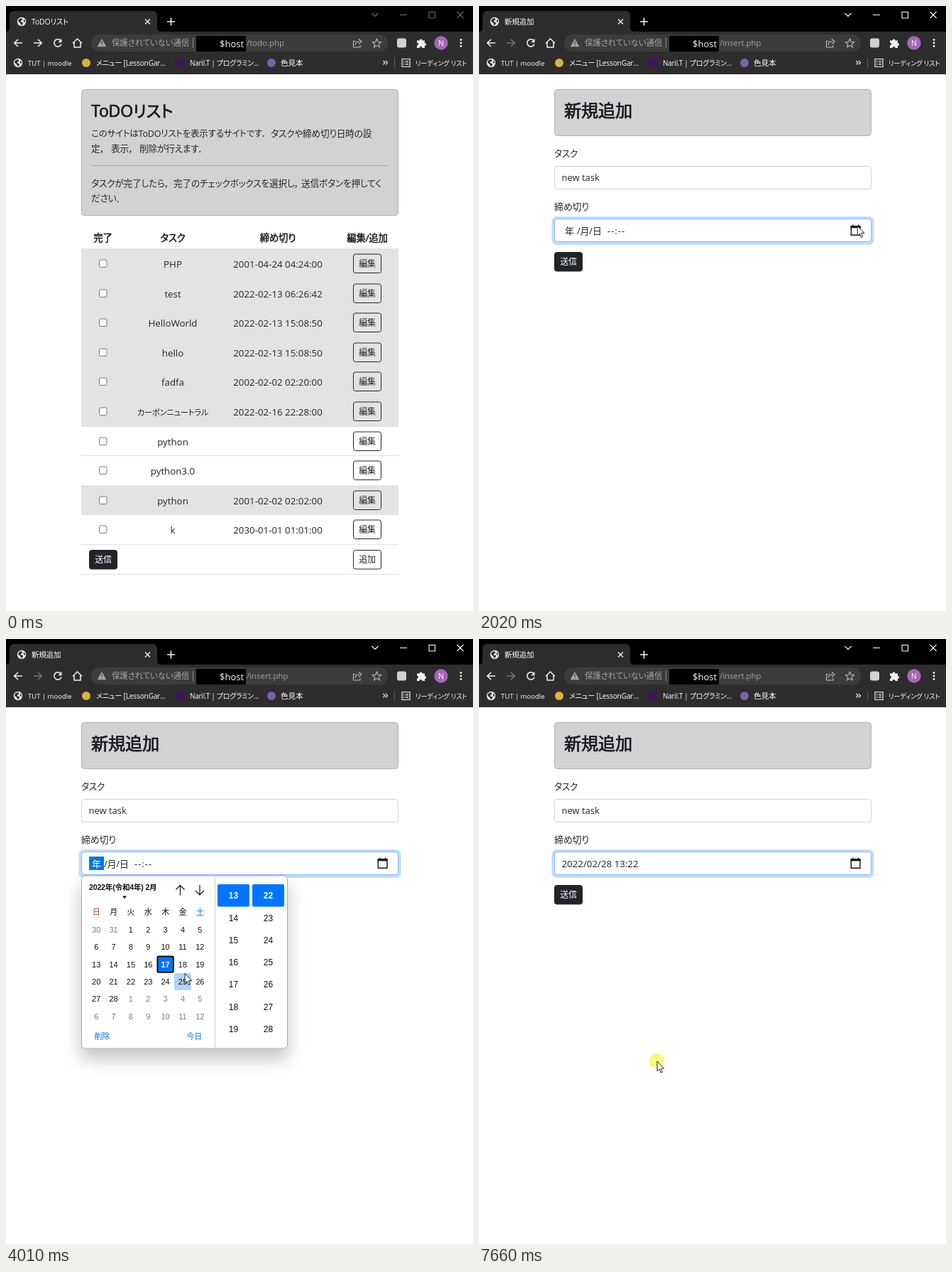
Animation of 658 by 851 pixels, one loop 7.99 s. Source, as an HTML page:

```html
<!DOCTYPE html>
<html lang="ja">
<head>
<meta charset="utf-8">
<title>ToDOリスト</title>
<style>
  html, body { margin: 0; width: 100%; height: 100%; overflow: hidden; background: #fff; }
  svg { display: block; width: 658px; height: 851px; }
  text { font-family: "Open Sans", "Noto Sans CJK JP", "Noto Sans CJK", sans-serif; white-space: pre; }
  .cjk { font-feature-settings: "palt"; letter-spacing: -.2px; }
  .pick { font-family: "Liberation Sans", "Noto Sans CJK JP", "Noto Sans CJK", sans-serif; }
</style>
</head>
<body>
<svg id="stage" viewBox="0 0 658 851" xmlns="http://www.w3.org/2000/svg"></svg>
<script>
const LOOP = 7990;
const INK = '#212529', BLUE = '#0075ff', HOVER = '#b2d3fb';

// Each step holds until the next one; unset fields carry over, `hover` and `click` do not.
const steps = [
  { at: 0, page: 'list' },
  { at: 330, cursor: 'arrow', x: 479, y: 758, hover: 'row' },
  { at: 670, cursor: 'hand', x: 499, y: 776, hover: 'add' },
  { at: 1020, page: 'insert', hover: 'status' },
  { at: 1350, cursor: 'arrow', x: 461.5, y: 609 },
  { at: 1690, x: 357.5, y: 184.5 },
  { at: 2020, x: 533, y: 309, typed: true, focus: true },
  { at: 2350, popup: true },
  { at: 2680, x: 265, y: 349, hover: 'down' },
  { at: 3010, x: 249, y: 404, hover: [5, 0] },
  { at: 3340, x: 172, y: 437, hover: [2, 1] },
  { at: 3680, x: 233.5, y: 480, hover: [4, 3] },
  { at: 4010, x: 251.8, y: 470, hover: [5, 3] },
  { at: 4340, x: 158.5, y: 503.5, hover: [1, 4] },
  { at: 4670, x: 161.5, y: 503.5, hover: [1, 4] },
  { at: 5350, x: 277.5, y: 475.5, picked: true, hover: [5, 3] },
  { at: 5680, x: 368, y: 391, hover: 'minute' },
  { at: 6010, x: 345.5, y: 392 },
  { at: 6340, x: 270, y: 529, hover: [6, 5] },
  { at: 6660, x: 262.5, y: 571 },
  { at: 7000, x: 247, y: 575 },
  { at: 7340, plain: true },
  { at: 7660, x: 250.7, y: 593.5, popup: false, click: true }
];
steps.reduce((prev, step) => Object.assign(step,
  { ...prev, hover: null, click: false, ...step }), {});

const rect = (x, y, w, h, fill, more = '') =>
  `<rect x="${x}" y="${y}" width="${w}" height="${h}" fill="${fill}" ${more}/>`;
const circle = (x, y, r, fill, more = '') =>
  `<circle cx="${x}" cy="${y}" r="${r}" fill="${fill}" ${more}/>`;
const line = (d, color, width = 1, more = '') =>
  `<path d="${d}" fill="none" stroke="${color}" stroke-width="${width}" ${more}/>`;
const shape = (d, fill, more = '') => `<path d="${d}" fill="${fill}" ${more}/>`;
const frame = (x, y, w, h, fill, color, r = 3, width = 1) =>
  rect(x, y, w, h, fill, `rx="${r}" stroke="${color}" stroke-width="${width}"`);
const move = (x, y, body) => `<g transform="translate(${x} ${y})">${body}</g>`;

function text(x, y, str, size = 12.7, fill = INK, more = '') {
  const cls = (/[\u3000-\u9fff\uff00-\uffef]/.test(str) ? 'cjk ' : '') + (more.includes('pick') ? 'pick' : '');
  return `<text x="${x}" y="${y}" font-size="${size}" fill="${fill}" class="${cls}" ${more.replace('pick', '')}>${str}</text>`;
}
const mid = (x, y, str, size, fill, more = '') =>
  text(x, y, str, size, fill, 'text-anchor="middle" ' + more);
// A thin outline gives a weight between regular and bold.
const medium = width => `stroke="#16191c" stroke-width="${width}"`;
const title = (str, size) => text(120, 156, str, size, '#16191c', medium(.7));
const heading = (x, str) => mid(x, 330.5, str, 13.4, '#16191c', medium(.45));

function button(x, y, label, solid) {
  return frame(x + .5, y + .5, 39, 26.5, solid ? INK : 'none', INK) +
    mid(x + 20, y + 18, label, 12, solid ? '#fff' : INK);
}

function globe(x, y) {
  return circle(x, y, 6.2, '#e8eaed') +
    move(x, y, shape('M-4 -3.5L0 -5L1.5 -2.5L-1 -1.5L-1 .5L2 1L1.5 3.5L-.5 5.2L-2 2L-5 -.5ZM3 -3.5L5 -1.5L4.5 1.5L2.8 -.5Z', '#333'));
}

function browser(s) {
  const list = s.page === 'list';
  const win = list ? '#6d6d6d' : '#fff', grey = '#a2a5a9', white = '#f1f1f1';
  const arrow = 'M6 0H-5M0 -5L-5.3 0L0 5';
  return rect(0, 0, 658, 37, '#000') + rect(0, 36, 658, 60, '#2d2d2d') +
    shape('M0 36Q5 36 5 31V14Q5 7 12 7H206Q213 7 213 14V31Q213 36 218 36Z', '#2d2d2d') +
    globe(22, 22) +
    text(36, 26, list ? 'ToDOリスト' : '新規追加', 10.5, '#fff') +
    line('M196 18.5L203 25.5M203 18.5L196 25.5', white, 1.4) +
    line('M227 22H238M232.5 16.5V27.5', white, 1.6) +
    line('M515.5 10L520 14.5L524.5 10M555 12.5H565M596 8.5H604.5V17H596ZM635.5 8L644.5 17M644.5 8L635.5 17', win, 1.1) +
    move(17, 52, line(arrow, white, 1.6)) +
    move(45, 52, `<g transform="scale(-1 1)">${line(arrow, list ? white : '#777', 1.6)}</g>`) +
    line('M77 48.5A5.2 5.2 0 1 0 78 53.5', white, 1.6) + shape('M78.5 46V51.2H73.3Z', white) +
    line('M94 52.5L100.5 46L107 52.5M96 51V58H105V51', white, 1.5) +
    rect(120, 40, 418, 24, '#3c3c3e', 'rx="12"') +
    shape('M135 46L141.3 57.3H128.7Z', grey) + line('M135 49.5V53.2M135 54.4V55.8', '#3c3c3e', 1.3) +
    text(149, 56, '保護されていない通信', 11.5, grey) +
    line('M263.5 45V59', '#8a8d91') +
    rect(268, 42, 70, 22, '#000') + text(301, 58, '$host', 13, '#fff') +
    text(339, 56, list ? '/todo.php' : '/insert.php', 11.4, grey) +
    line('M493 49.5H489.5V58H499V55M492 55Q492.5 50 498 50M497 46.5L501 50L497 53.5', '#bcbec1', 1.1) +
    line('M522.5 46.2L524.2 50.3L528.6 50.7L525.3 53.6L526.3 57.9L522.5 55.6L518.7 57.9L519.7 53.6L516.4 50.7L520.8 50.3Z', '#bcbec1', 1.1) +
    rect(551, 45.5, 13, 13, '#d2d2d2', 'rx="3"') +
    shape('M579 48.5H582.5A2 2 0 0 1 586.5 48.5H590V52A2 2 0 0 1 590 56V59H586.5A2 2 0 0 0 582.5 59H579V55.5A2 2 0 0 0 579 51.5Z', white) +
    circle(613, 52, 9.7, '#a866b8') + mid(613, 56, 'N', 10.5, '#fff') +
    [47.5, 52, 56.5].map(y => circle(641, y, 1.4, white)).join('') +
    globe(17, 80) + text(31, 84, 'TUT | moodle', 9.5, '#fff') +
    circle(113, 80, 6, '#d6b53c') + text(127, 84, 'メニュー [LessonGar...', 10.2, '#fff') +
    rect(238, 73, 14, 14, '#3a1a4e') + text(259, 84, 'Naril.T | プログラミン...', 9.9, '#fff') +
    circle(374, 80, 6, '#7a62a8') + text(387, 84, '色見本', 10.7, '#fff') +
    line('M531.5 77L534 79.7L531.5 82.4M535 77L537.5 79.7L535 82.4', white, 1.2) +
    line('M547.5 73V87', '#5f6063') +
    line('M558 74.5H569V85.5H558ZM560 77.5H561.5M563 77.5H567M560 80H561.5M563 80H567M560 82.5H561.5M563 82.5H567', white, 1.2) +
    text(577, 84, 'リーディング リスト', 9.3, '#fff');
}

const card = h => frame(106.5, 117.5, 446, h, '#d2d2d4', '#b1b1b3', 4);

const tasks = [
  ['PHP', '2001-04-24 04:24:00', 1], ['test', '2022-02-13 06:26:42', 1],
  ['HelloWorld', '2022-02-13 15:08:50', 1], ['hello', '2022-02-13 15:08:50', 1],
  ['fadfa', '2002-02-02 02:20:00', 1], ['カーボンニュートラル', '2022-02-16 22:28:00', 1],
  ['python', '', 0], ['python3.0', '', 0],
  ['python', '2001-02-02 02:02:00', 1], ['k', '2030-01-01 01:01:00', 0]
];

function listPage(s) {
  let out = card(177) + title('ToDOリスト', 23) +
    text(120, 184, 'このサイトはToDOリストを表示するサイトです．', 12.5) + text(373, 184, 'タスクや締め切り日時の設') +
    text(120, 205, '定，') + text(148, 205, '表示，') + text(188, 205, '削除が行えます．') +
    line('M120 224.5H539', '#a3a3a5') +
    text(120, 254, 'タスクが完了したら，') + text(236, 254, '完了のチェックボックスを選択し，') +
    text(416, 254, '送信ボタンを押してく') + text(120, 275, 'ださい．') +
    heading(136.5, '完了') + heading(235, 'タスク') + heading(383, '締め切り') + heading(509, '編集/追加');
  tasks.forEach(([name, due, late], i) => {
    const y = Math.round(341 + 41.6 * i), end = Math.round(341 + 41.6 * (i + 1));
    if (late) out += rect(106, y, 447, end - y, '#e3e3e3');
    out += line(`M106 ${end + .5}H553`, late ? '#dfdfdf' : '#dee0e2') +
      frame(131.5, y + 16, 10.5, 10.5, '#fff', '#767676', 2) +
      mid(235, y + 27, name, /[a-z]/i.test(name) ? 13.3 : 11.3) +
      mid(383, y + 27, due, 13.3) + button(489, y + 7.5, '編集');
  });
  if (s.hover) out += rect(106, 757, 447, 42, '#ebebeb');
  return out + line('M106 799.5H553', '#dee0e2') +
    button(117, 765, '送信', true) + button(489, 765, '追加', s.hover === 'add');
}

function dateValue(s) {
  const first = s.popup ? '#fff' : INK;
  if (s.picked) return (s.popup ? rect(117, 306, 30, 19, '#0078d7') : '') +
    text(116.5, 321, `<tspan fill="${first}">2022</tspan>/02/28 13:22`, 13.3);
  return (s.popup ? rect(117, 306, 21, 19, '#0078d7') : '') +
    text(121, 321, '年', 13, first) + text(138, 321, '/月/日', 13) +
    text(181, 321, '--:--', 13, INK, 'letter-spacing="1"');
}

function insertPage(s) {
  return card(65) + title('新規追加', 24.2) +
    text(106, 212, 'タスク', 12.6) + frame(106.5, 225.5, 446, 32, '#fff', '#ced4da', 4) +
    text(116.5, 246, s.typed ? 'new task' : 'Type in Your Task', 13, s.typed ? INK : '#6c757d') +
    text(106, 287, '締め切り', 13) +
    (s.focus ? rect(102.5, 296, 454, 40, '#c2dbfe', 'rx="7"') : '') +
    frame(106.5, 299.5, 446, 32, '#fff', s.focus ? '#86b7fe' : '#ced4da', 4) + dateValue(s) +
    line('M524.3 310H537V322.2H524.3Z', '#111', 1.4) + rect(523.6, 309.3, 14, 3, '#111') +
    line('M527 307.5V310M534.5 307.5V310', '#111', 1.5) +
    button(106, 346, '送信', true) +
    (s.hover === 'status' ? rect(0, 844, 115, 7, '#f2f2f2') : '');
}

function dayCell(s, col, row) {
  const n = row * 7 + col - 1, inMonth = n > 0 && n < 29;
  const day = n < 1 ? n + 31 : n > 28 ? n - 28 : n;
  const cx = 127.2 + 24.35 * col, cy = 409 + 24.3 * row;
  const selected = inMonth && day === (s.picked ? 28 : 17);
  let out = '';
  if (selected) out += s.plain ? rect(cx - 12, cy - 12, 24, 24, BLUE, 'rx="2"')
    : frame(cx - 11.2, cy - 11.2, 22.4, 22.4, BLUE, '#101010', 1.5, 2);
  else if (Array.isArray(s.hover) && s.hover[0] === col && s.hover[1] === row)
    out += rect(cx - 12, cy - 12, 24, 24, HOVER, 'rx="2"');
  else if (inMonth && day === 17) out += frame(cx - 11.7, cy - 11.7, 23.4, 23.4, 'none', '#767676', 2);
  return out + mid(cx, cy + 4, day, 11, selected ? '#fff' : inMonth ? '#101010' : '#7b7b7b',
    'pick' + (selected ? ' font-weight="700"' : ''));
}

function timeColumn(s, x, first) {
  let out = rect(x, 345, 45, 31.5, BLUE, 'rx="2"');
  if (s.hover === 'minute' && first === 22) out += rect(x, 376.5, 45, 31, HOVER, 'rx="2"');
  for (let i = 0; i < 7; i++)
    out += mid(x + 22.5, 365.3 + 31.25 * i, first + i, 12, i ? '#101010' : '#fff',
      'pick' + (i ? '' : ' font-weight="700"'));
  return out;
}

function picker(s) {
  let out = frame(106.5, 333, 290, 243, '#fff', '#a9a9a9', 5).replace('<rect', '<rect filter="url(#shadow)"') +
    text(117, 353, '2022年(令和4年) 2月', 10.6, '#101010', 'pick font-weight="700"') +
    shape('M163.8 361.5H170.2L167 365.3Z', '#101010') +
    (s.hover === 'down' ? rect(261, 342, 24, 24, '#e6e6e6', 'rx="2"') : '') +
    line('M245.5 360.5V346.5M239.5 352.5L245.5 346.5L251.5 352.5M273 346V360M267 354L273 360L279 354', '#101010', 1.2);
  [...'日月火水木金土'].forEach((d, i) => {
    out += mid(127.2 + 24.35 * i, 388, d, 11, i === 0 ? '#a8481a' : i === 6 ? '#0078d7' : '#101010', 'pick');
  });
  for (let i = 0; i < 42; i++) out += dayCell(s, i % 7, Math.floor(i / 7));
  return out + text(124.5, 563, '削除', 11, '#0078d7', 'pick') + text(254.5, 563, '今日', 11, '#0078d7', 'pick') +
    line('M294.5 333.5V575.5', '#cfcfcf') + timeColumn(s, 298, 13) + timeColumn(s, 347, 22);
}

function pointer(s) {
  if (!s.cursor) return '';
  const edge = 'stroke="#222" stroke-width="1" stroke-linejoin="round"';
  const body = s.cursor === 'arrow'
    ? shape('M.3 .3V14.4L3.4 11.5L5.5 16.6L7.7 15.7L5.6 10.7H9.9Z', '#fff', edge)
    : shape('M5.5 .8Q7 .8 7 2.6V8Q9 6.6 9.9 8.4Q11.8 7.4 12.5 9.1Q15 8.6 15 10.8V14C15 16.6 13.5 17.5 13.2 20.5H6C5.5 18 3 16 .8 12.6C0 11 1.8 10 3.2 11.6L4 12.5V2.6Q4 .8 5.5 .8Z', '#fff', edge) +
      line('M7 8V11.5M9.9 8.6V11.7M12.5 9.3V12', '#222', .9);
  return (s.click ? circle(s.x, s.y, 10.5, '#fcf97e') : '') + move(s.x, s.y, body);
}

const defs = '<defs><filter id="shadow" x="-20%" y="-20%" width="140%" height="150%">' +
  '<feDropShadow dx="0" dy="14" stdDeviation="12" flood-color="#000" flood-opacity=".24"/></filter></defs>';

const render = s => defs + rect(0, 0, 658, 851, '#fff') + browser(s) +
  (s.page === 'list' ? listPage(s) : insertPage(s)) + (s.popup ? picker(s) : '') + pointer(s);

const stage = document.getElementById('stage');
let shown = null;

function update() {
  const t = performance.now() % LOOP;
  const step = steps.filter(s => s.at <= t).pop();
  if (step !== shown) {
    stage.innerHTML = render(step);
    shown = step;
  }
  requestAnimationFrame(update);
}
update();
</script>
</body>
</html>
```
